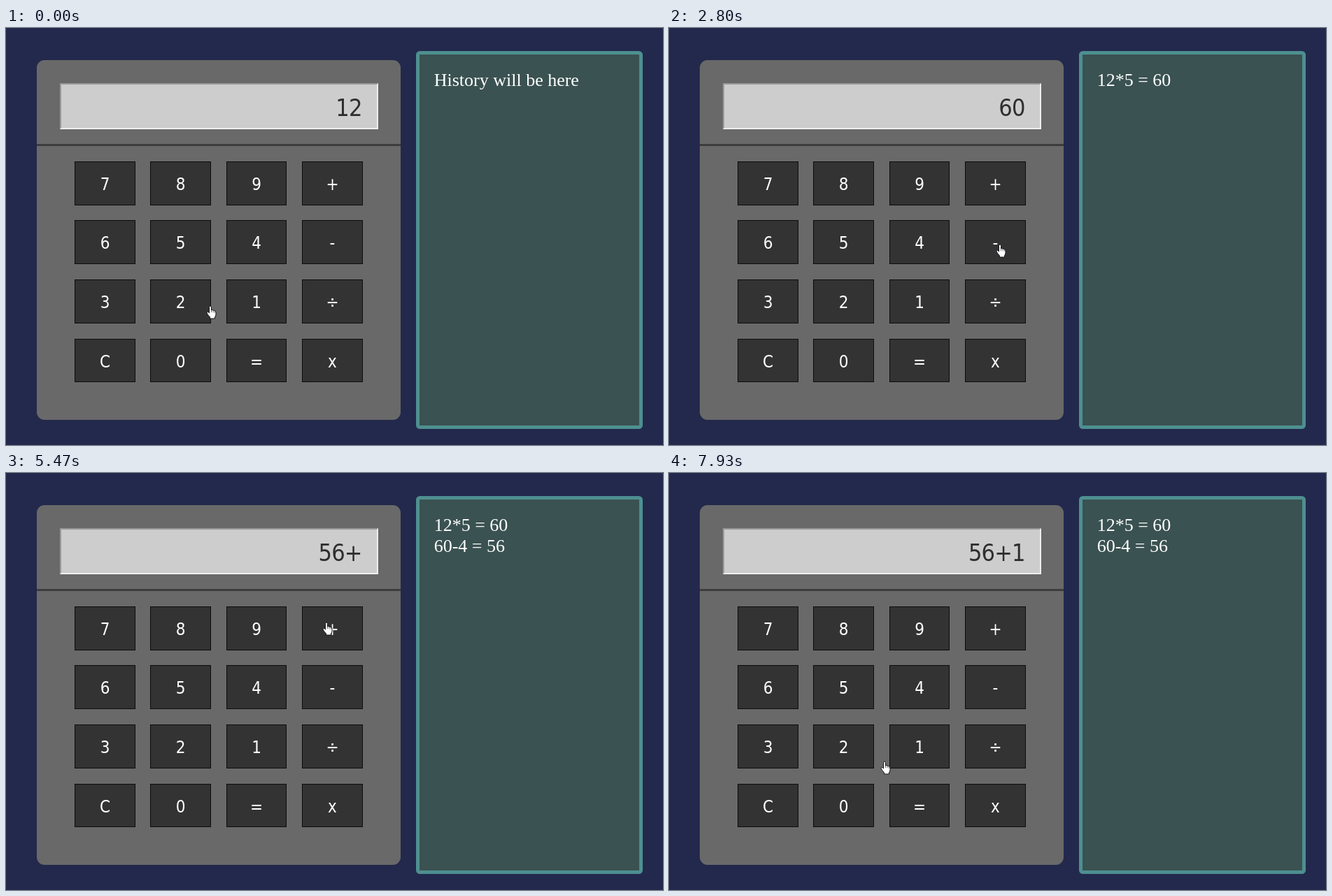
An HTML page that plays this animation: 939x597 px, repeating every 8 s.

```html
<!DOCTYPE html>
<html lang="en">
<head>
<meta charset="utf-8">
<title>Calculator</title>
<style>
  html, body { margin: 0; width: 100%; height: 100%; overflow: hidden; background: #23294c; }
  svg { display: block; width: 939px; height: 597px; }
  .calc { font-family: "DejaVu Sans Condensed", "Noto Sans", sans-serif; }
  .key { fill: #333; stroke: #0c0c0c; }
  .label { fill: #fff; font-size: 24px; text-anchor: middle; }
  #display { fill: #2e2e2e; font-size: 34px; letter-spacing: -.026em; text-anchor: end; }
  .history { fill: #fff; font: 26px "Liberation Serif", "Times New Roman", serif; }
  #hand, #arrow { fill: #fff; stroke: #15151c; stroke-linejoin: round; }
</style>
</head>
<body>
<svg viewBox="0 0 939 597">
  <rect x="44" y="46" width="520" height="515" rx="11" fill="#696969"/>
  <rect x="44" y="166" width="520" height="3" fill="#3d3d3d"/>
  <rect x="77" y="79" width="455" height="66" fill="#cdcdcd"/>
  <path d="M77 145V79H532L530 81H79V143Z" fill="#9a9a9a"/>
  <path d="M77 145H532V79L530 81V143H79Z" fill="#eee"/>
  <text id="display" class="calc" x="508.5" y="126"></text>
  <g id="keys" class="calc"></g>
  <rect x="588.5" y="35.5" width="319" height="536" rx="3" fill="#3a5251" stroke="#4e8f90" stroke-width="5"/>
  <text id="line1" class="history" x="611.7" y="83"></text>
  <text id="line2" class="history" x="611.7" y="113"></text>
  <g id="cursor">
    <g id="hand">
      <path d="M-1.5 10V1.5Q-1.5 0 0 0T1.5 1.5V6Q2.6 5 4 6.2Q5.5 5.6 6.2 7Q8 6.8 8 9V12Q8 14 6.5 16V18H-.5V16Q-3 13.5-5 10Q-5 8-3.2 8.4Z"/>
      <path d="M1.5 6V9M4 6.4V9.3M6.2 7.2V9.8" fill="none" stroke-width=".6"/>
    </g>
    <path id="arrow" d="M.5 .5V12.2L3 9.8L5 14.2L6.8 13.4L4.9 9.2H8.5Z"/>
  </g>
</svg>
<script>
const LOOP = 8000, STEP = 1000 / 15;
const $ = id => document.getElementById(id);

// Pointer moves: leave step, arrive step, x, y, sideways bow
const moves = [
  [0, 0, 292, 398],
  [0, 7, 460, 472],
  [13, 21, 229, 309],
  [22, 28, 366, 476],
  [31, 42, 473, 310],
  [46, 49, 348, 314],
  [51, 62, 343, 488, -70],
  [66, 80, 458, 214, -250],
  [82, 94, 258, 317],
  [94, 96, 192, 314],
  [96, 103, 190, 241, -52],
  [103, 107, 195, 300],
  [107, 115, 342, 393, -198],
  [115, 119, 307.5, 413]
];

// Keys pressed, by step
const presses = { 14: "x", 22: "5", 32: "=", 47: "-", 52: "4", 61: "=", 82: "+", 116: "1" };
const signs = { x: "*", "÷": "/" };
const operations = {
  "+": (a, b) => a + b,
  "-": (a, b) => a - b,
  "*": (a, b) => a * b,
  "/": (a, b) => a / b
};

const keys = [..."789+654-321÷C0=x"].map((label, i) => {
  const left = 98.1 + (i % 4) * 108.25, top = 190.7 + Math.floor(i / 4) * 84.6;
  const [x, y] = [left, top].map(Math.round);
  return { label, x, y, w: Math.round(left + 86.75) - x, h: Math.round(top + 62.9) - y };
});

function add(tag, attrs, text = "") {
  const el = document.createElementNS("http://www.w3.org/2000/svg", tag);
  for (const name in attrs) el.setAttribute(name, attrs[name]);
  el.textContent = text;
  $("keys").append(el);
}

for (const { label, x, y, w, h } of keys) {
  add("rect", { class: "key", x: x + .5, y: y + .5, width: w - 1, height: h - 1 });
  add("text", { class: "label", x: x + w / 2, y: y + 41 }, label);
}

function pointAt(step) {
  const i = moves.findLastIndex(m => m[0] <= step);
  const [leave, arrive, x1, y1, bow = 0] = moves[i];
  const [, , x0, y0] = moves[Math.max(0, i - 1)];
  const u = Math.min(1, (step - leave) / (arrive - leave || 1));
  const e = u * u * (3 - 2 * u);
  return [x0 + (x1 - x0) * e + 2 * bow * e * (1 - e), y0 + (y1 - y0) * e];
}

// The pointer switches to a hand slightly before a key's left edge
const overKey = (px, py) => keys.some(({ x, y, w, h }) =>
  px > x - 8 && px < x + w && py >= y && py < y + h);

function calculate(step) {
  let value = "12";
  const history = [];
  for (const at in presses) {
    if (at > step) break;
    const key = presses[at];
    if (key === "=") {
      const [, a, sign, b] = value.match(/(\d+)(\D)(\d+)/);
      const result = String(operations[sign](+a, +b));
      history.push(`${value} = ${result}`);
      value = result;
    } else value += signs[key] || key;
  }
  return { value, history };
}

let shownStep;
function draw() {
  requestAnimationFrame(draw);
  const step = Math.floor((performance.now() % LOOP + 4) / STEP);
  if (step === shownStep) return;
  shownStep = step;

  const { value, history } = calculate(step);
  $("display").innerHTML = value.replace(/\*(.?)/, '<tspan dx="2">*</tspan><tspan dx="2">$1</tspan>');
  $("line1").textContent = history[0] || "History will be here";
  $("line2").textContent = history[1] || "";

  const [x, y] = pointAt(step).map(Math.round);
  const hand = overKey(x, y);
  $("hand").style.display = hand ? "" : "none";
  $("arrow").style.display = hand ? "none" : "";
  $("cursor").setAttribute("transform", `translate(${x} ${y})`);
}
draw();
</script>
</body>
</html>
```
